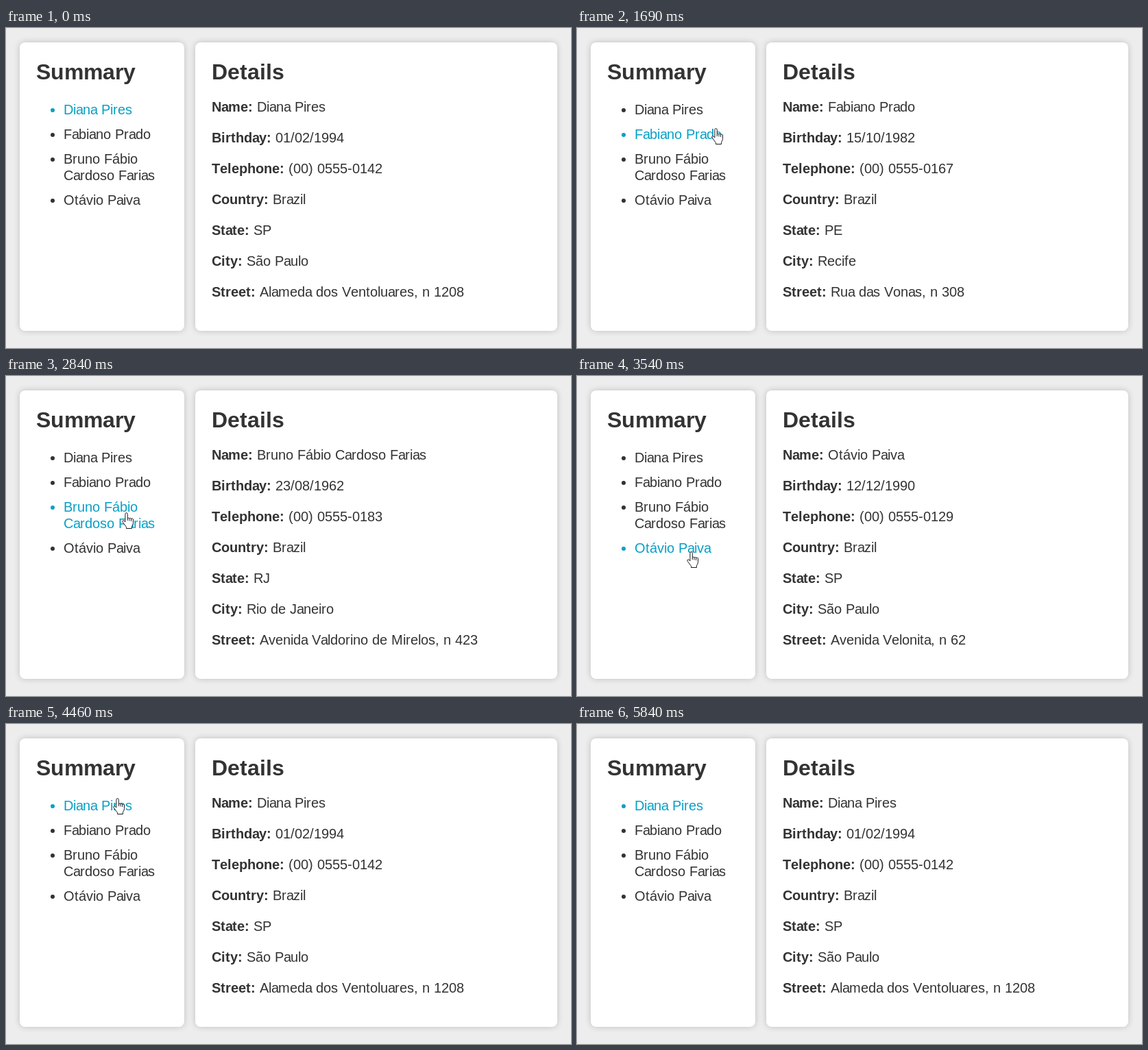
An HTML page with a canvas for the animation above (6150 ms loop, 824x467 px).

```html
<!DOCTYPE html>
<html lang="en">
<head>
<meta charset="utf-8">
<title>Summary and details</title>
<style>
html, body { margin: 0; width: 100%; height: 100%; overflow: hidden; background: #ededed; }
canvas { display: block; }
</style>
</head>
<body>
<canvas id="stage" width="824" height="467"></canvas>
<script>
const ctx = document.getElementById('stage').getContext('2d', { alpha: false });
const LOOP = 6150;
const FAMILY = '"Liberation Sans", Arial, sans-serif';
const BODY = '20px ' + FAMILY;
const BOLD = 'bold 20px ' + FAMILY;
const HEADING = 'bold 32px ' + FAMILY;
const INK = '#333', ACTIVE = '#08a0c6', HOVER = '#777';
const LINE = 24, ITEM_GAP = 12, ROW = 45;
const LABELS = ['Name', 'Birthday', 'Telephone', 'Country', 'State', 'City', 'Street'];

const people = [
  { lines: ['Diana Pires'],
    info: ['01/02/1994', '(00) 0555-0142', 'Brazil', 'SP', 'São Paulo', 'Alameda dos Ventoluares, n 1208'] },
  { lines: ['Fabiano Prado'],
    info: ['15/10/1982', '(00) 0555-0167', 'Brazil', 'PE', 'Recife', 'Rua das Vonas, n 308'] },
  { lines: ['Bruno Fábio', 'Cardoso Farias'],
    info: ['23/08/1962', '(00) 0555-0183', 'Brazil', 'RJ', 'Rio de Janeiro', 'Avenida Valdorino de Mirelos, n 423'] },
  { lines: ['Otávio Paiva'],
    info: ['12/12/1990', '(00) 0555-0129', 'Brazil', 'SP', 'São Paulo', 'Avenida Velonita, n 62'] }
];
let nextTop = 107;
for (const person of people) {
  person.top = nextTop;
  person.height = LINE * person.lines.length;
  nextTop += person.height + ITEM_GAP;
}

// The pointer rests between glides and is redrawn 13 times a second.
const TICK = 1000 / 13, TICK_OFFSET = 18;
const POINTER_IN = 440, POINTER_OUT = 5840;
const origin = { x: 465, y: 298 };
const glides = [
  { from: 590, to: 1058, x: 224, y: 154 },
  { from: 1058, to: 1280, x: 202, y: 146 },
  { from: 2000, to: 2212, x: 178, y: 182 },
  { from: 2212, to: 2370, x: 176, y: 194 },
  { from: 2760, to: 3135, x: 166, y: 256 },
  { from: 3590, to: 4060, x: 162, y: 108 },
  { from: 4750, to: 4982, x: 228, y: 152 },
  { from: 4982, to: 5367, x: 712, y: 380 },
  { from: 5367, to: 5752, x: 794, y: 455 }
];

// Every click picks the next person down the list, wrapping to the first.
const clicks = [
  { down: 1520, up: 1690 },
  { down: 2530, up: 2610 },
  { down: 3460, up: 3540 },
  { down: 4380, up: 4460 }
];

const arrow = new Path2D('M.5 .5V16.5L4.2 13L6.8 18.6L9 17.7L6.5 12H11.5Z');
const hand = new Path2D('M4.9 14V2.4A1.7 1.7 0 0 1 8.3 2.4V9A1.4 1.4 0 0 1 11 9.3' +
  'A1.4 1.4 0 0 1 13.7 10A1.4 1.4 0 0 1 16.5 11V15.5Q16.5 18 14.5 20.5V23.5H6.5V21.5' +
  'L1.2 14.2Q.3 12.3 1.8 11.7Q3 11.4 4.9 14Z');
const knuckles = new Path2D('M8.3 9V12M11 9.3V12.5M13.7 10V13');

// Whole-pixel advances, as in grid-fitted screen text.
function advance(char, font) {
  if (font !== HEADING && char === 'a') return 10;
  return Math.round(ctx.measureText(char).width);
}

function write(text, x, y, font, color) {
  ctx.font = font;
  ctx.fillStyle = color;
  for (const char of text) {
    ctx.fillText(char, x, y);
    x += advance(char, font);
  }
  return x;
}

function disc(x, y, r, color) {
  ctx.fillStyle = color;
  ctx.beginPath();
  ctx.arc(x, y, r, 0, 2 * Math.PI);
  ctx.fill();
}

function card(x, width, title) {
  ctx.save();
  ctx.shadowColor = 'rgba(0,0,0,.2)';
  ctx.shadowBlur = 10;
  ctx.fillStyle = '#fff';
  ctx.beginPath();
  ctx.roundRect(x, 21, width, 421, 8);
  ctx.fill();
  ctx.restore();
  write(title, x + 24, 75, HEADING, INK);
}

function smooth(k) {
  const c = Math.min(1, Math.max(0, k));
  return c * c * (3 - 2 * c);
}

function pointerAt(time) {
  if (time < POINTER_IN || time >= POINTER_OUT) return null;
  const t = Math.floor((time + TICK_OFFSET) / TICK) * TICK - TICK_OFFSET;
  let { x, y } = origin;
  for (const glide of glides) {
    const k = smooth((t - glide.from) / (glide.to - glide.from));
    x += (glide.x - x) * k;
    y += (glide.y - y) * k;
  }
  return { x: Math.round(x), y: Math.round(y) };
}

function isOver(person, { x, y }) {
  return x >= 84 && x < 236 && y >= person.top && y < person.top + person.height;
}

function drawList(selected, hovered) {
  for (const person of people) {
    const color = person === selected ? ACTIVE : person === hovered ? HOVER : INK;
    disc(68, person.top + 13, 3, color);
    person.lines.forEach((line, i) => write(line, 84, person.top + 19 + LINE * i, BODY, color));
  }
}

function drawDetails(person) {
  const values = [person.lines.join(' '), ...person.info];
  LABELS.forEach((label, i) => {
    const y = 122 + ROW * i;
    const x = write(label + ': ', 300, y, BOLD, INK);
    write(values[i], x, y, BODY, INK);
  });
}

function drawPointer({ x, y }, overItem) {
  ctx.save();
  ctx.translate(overItem ? x - 6 : x, y);
  ctx.fillStyle = '#fff';
  ctx.strokeStyle = '#1c1c24';
  const shape = overItem ? hand : arrow;
  ctx.fill(shape);
  ctx.stroke(shape);
  if (overItem) ctx.stroke(knuckles);
  ctx.restore();
}

function draw(t) {
  const done = clicks.filter(click => click.up <= t).length;
  const selected = people[done % people.length];
  const pointer = pointerAt(t);
  const hovered = pointer && people.find(person => isOver(person, pointer));

  ctx.fillStyle = '#ededed';
  ctx.fillRect(0, 0, 824, 467);
  card(20, 240, 'Summary');
  card(276, 528, 'Details');
  drawList(selected, hovered);
  drawDetails(selected);
  if (!pointer) return;
  drawPointer(pointer, hovered);
  const pressed = clicks.some(click => t >= click.down && t < click.up);
  if (pressed) disc(pointer.x, pointer.y, 12, 'rgba(255,255,0,.47)');
}

const begin = performance.now();
function frame() {
  draw((performance.now() - begin) % LOOP);
  requestAnimationFrame(frame);
}
frame();
</script>
</body>
</html>
```
